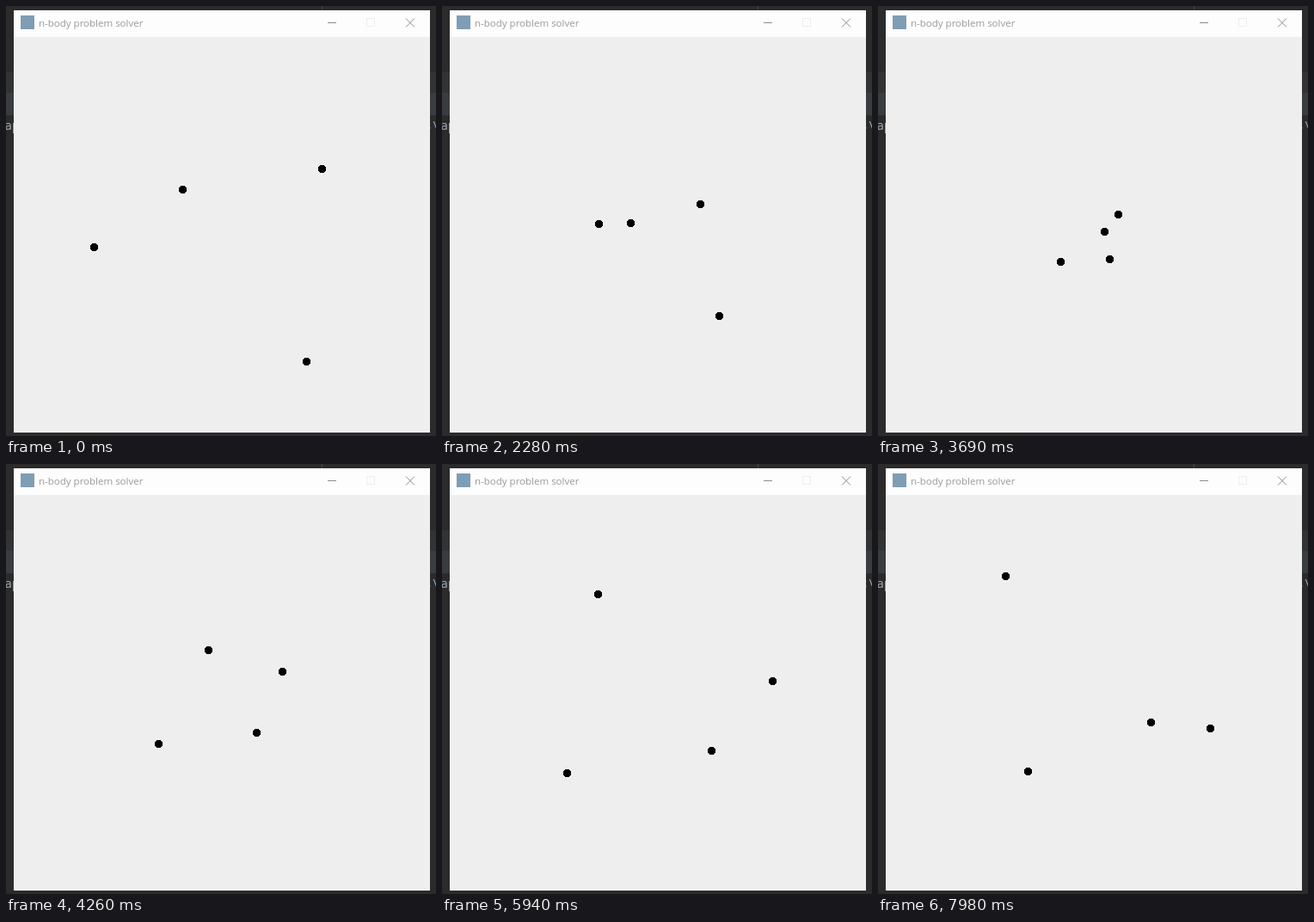
Write an HTML page that moves like this. It is 500x500 px and loops after 8 s.

```html
<!DOCTYPE html>
<html lang="en">
<head>
<meta charset="utf-8">
<title>n-body problem solver</title>
<style>
  html, body { margin: 0; width: 100%; height: 100%; overflow: hidden; background: #2b2b2b; }
  svg { display: block; width: 100vw; height: 100vh; }
  .title { font: 11.5px "Open Sans", "Noto Sans", sans-serif; fill: #999; }
  .code { font: 14px "Noto Sans Mono", "DejaVu Sans Mono", monospace; fill: #9dabb8; }
</style>
</head>
<body>
<svg viewBox="0 0 500 500">
  <!-- editor behind the window -->
  <rect width="500" height="500" fill="#2b2b2b"/>
  <rect y="77" width="500" height="24" fill="#313335"/>
  <rect y="101" width="500" height="26" fill="#3a3d3f"/>
  <rect x="367" width="1" height="5" fill="#484848"/>
  <text class="code" x="-1.5" y="144">ap</text>
  <text class="code" x="486.5" y="144">s\</text>

  <!-- window -->
  <rect x="9" y="5" width="484" height="491" fill="#eee"/>
  <rect x="9" y="5" width="484" height="31" fill="#fdfdfd"/>
  <rect x="17" y="11" width="16" height="16" fill="#7f9db5"/>
  <text class="title" x="38" y="24">n-body problem solver</text>
  <g fill="none" stroke="#8c8c8c">
    <path d="M374 19.5h10M465 14.5l10 10M475 14.5l-10 10"/>
    <rect x="419.5" y="14.5" width="9" height="9" stroke="#ededed"/>
  </g>
  <g id="bodies" shape-rendering="crispEdges"></g>
</svg>
<script>
const LOOP = 8000, STEP = 30;

// Key points of three bodies; the fourth keeps the centre of mass still.
const times = [0, 1410, 2280, 3120, 4260, 5940, 6960, 7980];
const keys = {
  x: [[102, 143, 182, 235, 321, 384, 390.5, 385.6],
      [205, 203.8, 219, 246, 291, 313, 320, 316.6],
      [367, 339, 300, 250.8, 176.8, 145, 150.5, 173.6]],
  y: [[279.8, 263, 252.8, 245, 241, 252, 274, 307],
      [213, 235, 252, 274, 312, 332.8, 321.5, 300],
      [189, 206, 230, 267, 325, 359, 364, 357]]
};
const balance = { x: 1023.4, y: 1094.4 };

// Smooth curve through unevenly spaced values, with parabolic tangents.
function spline(values) {
  const last = values.length - 1;
  const span = i => times[i + 1] - times[i];
  const slope = i => (values[i + 1] - values[i]) / span(i);
  const tangents = values.map((_, i) => i === 0 || i === last ? 0 :
    (slope(i - 1) * span(i) + slope(i) * span(i - 1)) / (span(i - 1) + span(i)));
  tangents[0] = 2 * slope(0) - tangents[1];
  tangents[last] = 2 * slope(last - 1) - tangents[last - 1];

  return t => {
    let i = 0;
    while (i < last - 1 && t >= times[i + 1]) i++;
    const h = span(i), u = (t - times[i]) / h, w = 1 - u;
    return values[i] * w * w * (1 + 2 * u) + values[i + 1] * u * u * (3 - 2 * u)
      + h * u * w * (tangents[i] * w - tangents[i + 1] * u);
  };
}

const curves = { x: keys.x.map(spline), y: keys.y.map(spline) };

function positions(axis, t) {
  const known = curves[axis].map(curve => curve(t));
  return [...known, balance[axis] - known.reduce((sum, v) => sum + v)];
}

const group = document.getElementById("bodies");
const dots = Array.from({ length: 4 }, () => {
  const dot = document.createElementNS(group.namespaceURI, "circle");
  dot.setAttribute("r", 4.7);
  group.append(dot);
  return dot;
});

const start = performance.now();
function frame() {
  const elapsed = (performance.now() - start) % LOOP;
  const t = Math.floor(elapsed / STEP) * STEP;
  const xs = positions("x", t), ys = positions("y", t);
  dots.forEach((dot, i) => {
    dot.setAttribute("cx", Math.round(xs[i]) + 0.5);
    dot.setAttribute("cy", Math.round(ys[i]) + 0.5);
  });
  requestAnimationFrame(frame);
}
frame();
</script>
</body>
</html>
```
